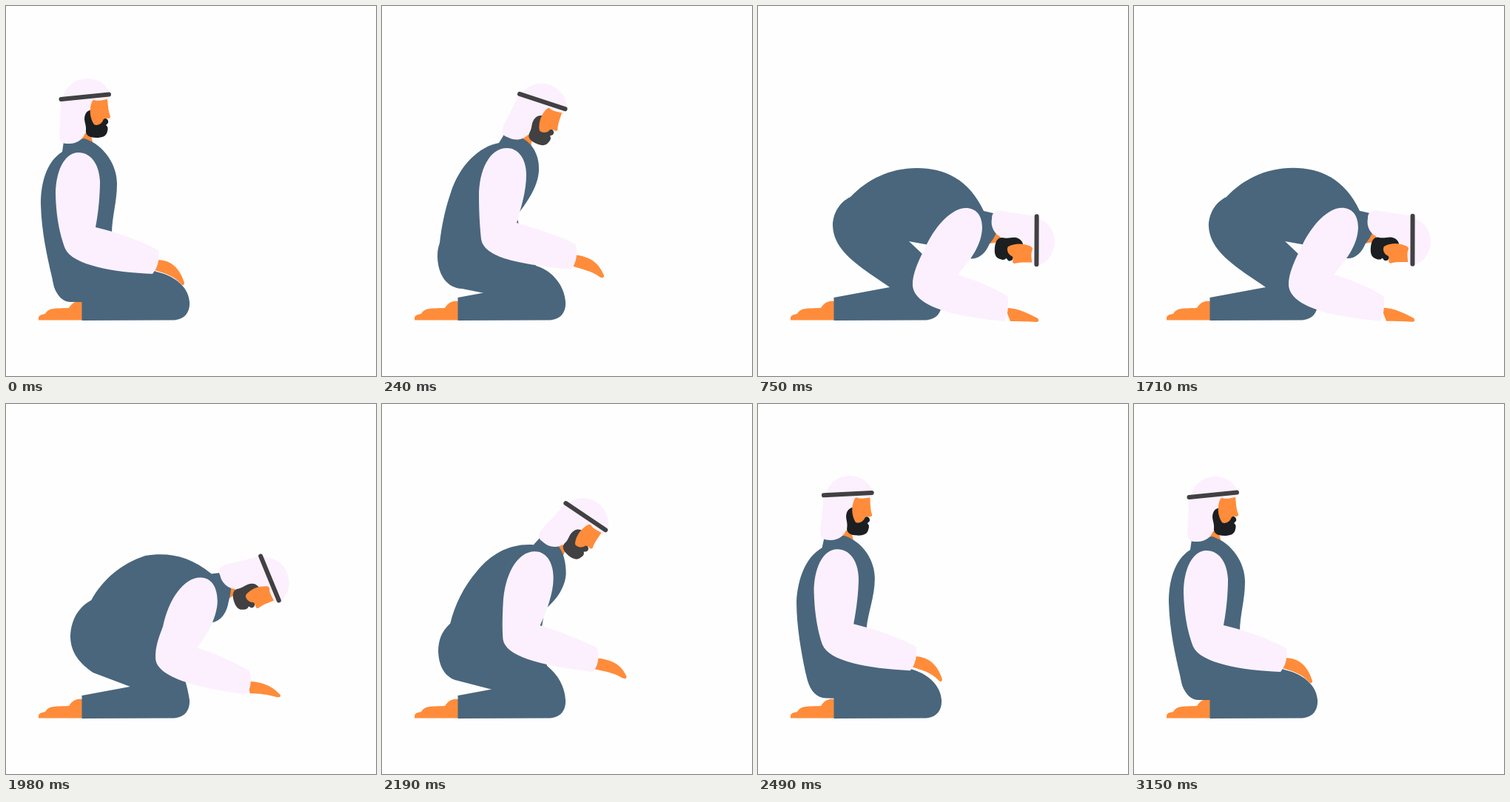
Animation of 500 by 500 pixels, one loop 4680 ms. Source, as an HTML page:

```html
<!DOCTYPE html>
<html lang="en">
<head>
<meta charset="utf-8">
<title>Kneeling and bowing</title>
<style>
html, body { margin: 0; width: 100%; height: 100%; overflow: hidden; background: #fefefe; }
svg { display: block; width: 100vw; height: 100vh; }
.skin { fill: #ff8c3a; }
.robe { fill: #49667d; }
.cloth { fill: #fcf0fe; }
</style>
</head>
<body>
<svg viewBox="0 0 500 500">
  <path class="skin" d="M44 424.500V421C45 417 49 417 53 416C58 407 68 409 85 408C90 400 96 398 104 399V424.500Z"/>
  <g class="head"><path class="skin" d="M104 172H114L118 187L112 192L100 184Z"/></g>
  <path class="robe" d="M102.500 394L178 380L215 385L248 400C249 415 240 424.500 225 424.500L102.500 425Z"/>
  <path class="robe" id="body"/>
  <path class="skin" id="hand"/>
  <path class="cloth" id="sleeve"/>
  <g class="head">
    <path class="cloth" d="M77 123C82 107 94 98 109 98C125 98 137 107 141 119L139 127C131 124 123 129 116 129L115 141L108 146C105 155 109 160 108 168C106 180 95 187 84 186C74 187 72 181 72 172C73 158 74 140 74 125Z"/>
    <path id="beard" d="M107 147C109 142 113 140 118 140L125 156L131 152C136 151 139 154 138 158L135 161C138 163 138 166 137 169C136 176 130 178 122 178C112 178 107 174 108 168C109 160 104 155 107 147Z"/>
    <path class="skin" d="M114 138C115 132 116 127 119 127C125 129 130 127 137 126C138 134 138 142 141 149C141 152 139 152 137 152C134 151 131 153 131 155C128 161 121 162 119 160C115 154 113 146 114 138Z"/>
    <path d="M74.500 126L139 119.500" fill="none" stroke="#414042" stroke-width="6" stroke-linecap="round"/>
  </g>
</svg>
<script>
const LOOP = 4680, STEP = 30;
// Bow amount of each key pose: upright, leaning, low lean, prostrate
const BOW = [0, .25, .41, 1];

// Every pose of a part uses the same path commands
const POSES = {
  body: [
    'M78 183L76 197C54 211 47 240 47 268C48 306 56 340 62 366C63 371 64 376 65 380C70 393 78 401 90 400L103 400L225 424L248 400C247 384 234 366 203 359L150 330L143 308C143 285 150 265 150 240C150 215 133 188 106 179Z',
    'M166 172L158 185C131 190 105 215 93 252C85 275 80 300 78 320C75 329 75 333 75 340C76 364 88 381 108 382L138 388L225 424L248 400C247 380 232 358 208 351L190 315L182 284C195 266 211 245 212 222C213 203 204 186 190 179Z',
    'M212 181L204 190C173 188 147 202 128 226C110 247 98 272 92 297C80 308 76 320 76 335C77 356 86 370 102 374L149 386L225 424L248 400C247 382 238 366 223 354L212 325L219 278C235 265 247 248 248 229C248 215 245 199 236 190Z',
    'M318 280L305 277C285 234 252 219 215 219C177 219 147 235 125 258C108 266 101 283 101 297C102 325 125 343 150 361L178 380L225 424L248 400C243 380 235 355 222 335L204 318L270 330C285 349 304 343 313 321C317 317 321 310 323 304Z'
  ],
  sleeve: [
    'M98 198C78 198 67 225 67 255C68 290 74 312 80 328C90 350 145 360 198 362C205 354 208 342 206 330C180 316 150 306 121 299C125 278 127 255 127 237C126 213 114 198 98 198Z',
    'M169 192C145 192 131 222 131 257C131 285 133 305 134 315C138 338 175 348 255 356C262 350 265 335 262 322C240 310 205 300 182 293C188 272 195 250 195 228C195 205 183 192 169 192Z',
    'M206 199C182 199 165 230 163 270C162 290 162 305 163 318C166 340 210 353 284 362C291 356 294 343 290 329C265 317 240 307 213 299C222 280 231 255 231 235C231 212 220 199 206 199Z',
    'M281 273C262 273 241 296 228 322C218 342 208 362 209 378C212 408 270 420 333 426C337 418 340 405 337 392C318 380 295 371 270 363C290 340 302 322 303 300C303 282 294 273 281 273Z'
  ],
  hand: [
    'M204 343C226 343 236 358 241 374C241 378 238 378 236 375C226 364 214 361 201 357Z',
    'M260 336C285 339 294 350 300 364C300 368 297 368 294 366C284 358 270 356 256 351Z',
    'M288 343C314 345 324 355 330 368C330 372 327 371 324 370C313 363 301 361 286 358Z',
    'M334 408C352 408 366 416 378 422C380 425 379 427 376 427C364 426 352 426 341 426Z'
  ]
};
const PIVOT = [[106.5, 122.8], [216.5, 129], [274, 151.5], [376.5, 316.5]];

// Smooth curve through four values placed at the BOW positions
function curve(v) {
  const h = [0, 1, 2].map(i => BOW[i + 1] - BOW[i]);
  const s = h.map((w, i) => (v[i + 1] - v[i]) / w);
  const inner = i => (h[i - 1] * s[i] + h[i] * s[i - 1]) / (h[i - 1] + h[i]);
  const m = [0, inner(1), inner(2), 0];
  m[0] = 2 * s[0] - m[1];
  m[3] = 2 * s[2] - m[2];
  return p => {
    const i = p < BOW[1] ? 0 : p < BOW[2] ? 1 : 2;
    const u = (p - BOW[i]) / h[i], w = 1 - u;
    return v[i] * w * w * (1 + 2 * u) + v[i + 1] * u * u * (3 - 2 * u)
      + h[i] * u * w * (m[i] * w - m[i + 1] * u);
  };
}

const curvesOf = rows => rows[0].map((_, k) => curve(rows.map(r => r[k])));
const parts = Object.entries(POSES).map(([id, paths]) => ({
  node: document.getElementById(id),
  layout: paths[0],
  curves: curvesOf(paths.map(d => d.match(/\d+/g).map(Number)))
}));
const pivot = curvesOf(PIVOT);
const heads = document.querySelectorAll('.head');
const beard = document.getElementById('beard');

const ease = (t, start, length) => {
  const u = Math.min(1, Math.max(0, (t - start) / length));
  return (1 - Math.cos(Math.PI * u)) / 2;
};

function draw(t) {
  const p = ease(t, 0, 720) - ease(t, 1690, 900);
  for (const { node, layout, curves } of parts) {
    let k = 0;
    node.setAttribute('d', layout.replace(/\d+/g, () => curves[k++](p).toFixed(2)));
  }
  const [x, y] = pivot.map(f => f(p));
  const [x0, y0] = PIVOT[0];
  for (const head of heads) {
    head.setAttribute('transform', `translate(${x} ${y}) rotate(${96 * p}) translate(${-x0} ${-y0})`);
  }
  beard.setAttribute('fill', p > .1 && p < .9 ? '#414042' : '#1b1f21');
}

const begin = performance.now();
function tick() {
  const t = (performance.now() - begin) % LOOP;
  draw(Math.floor(t / STEP) * STEP);
  requestAnimationFrame(tick);
}
draw(0);
requestAnimationFrame(tick);
</script>
</body>
</html>
```
